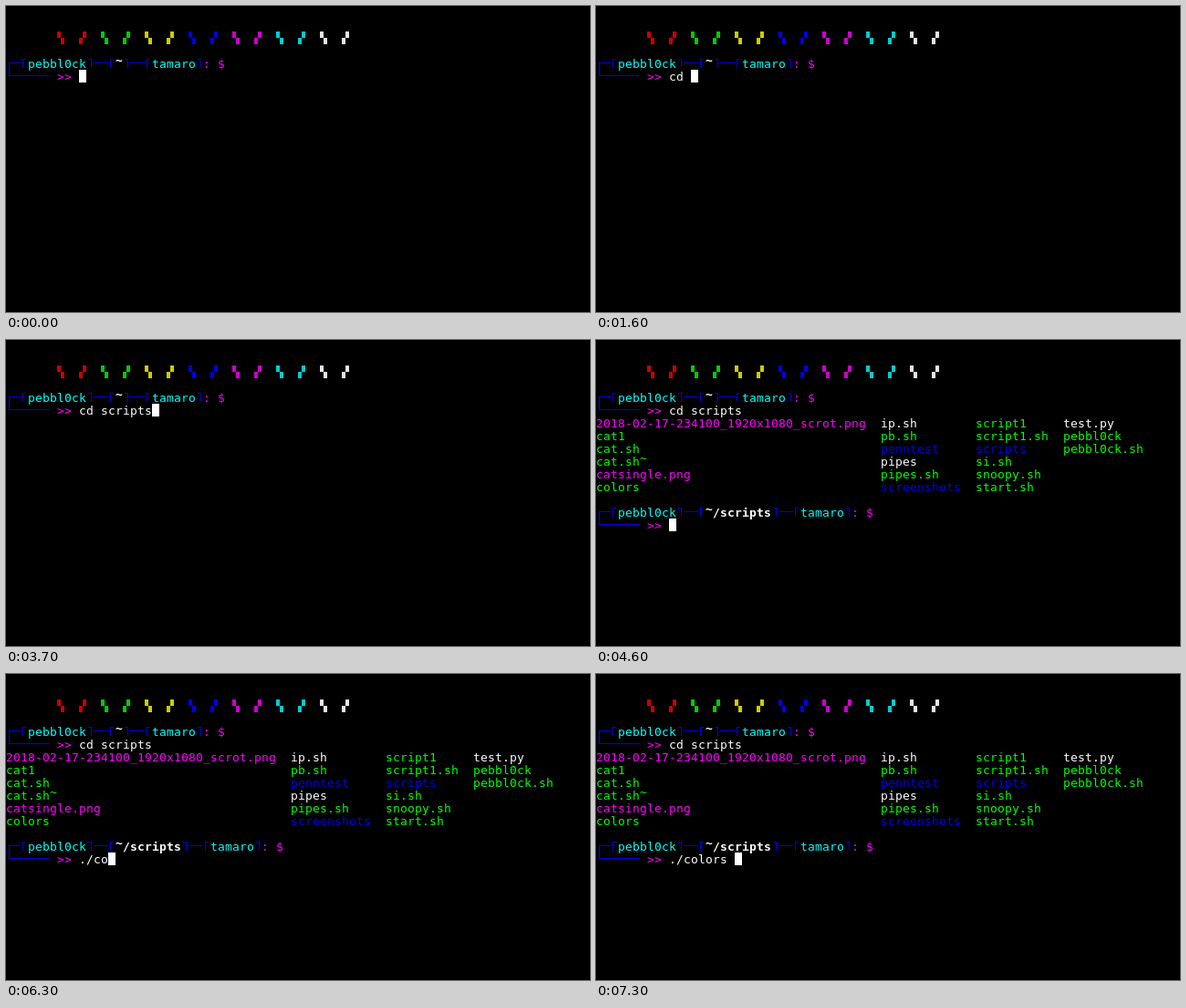
Animation, 640 px wide and 336 px high, one loop 8 s. Source, as an HTML page with a canvas:

```html
<!DOCTYPE html>
<html lang="en">
<head>
<meta charset="utf-8">
<title>Terminal session</title>
<style>
  html, body { margin: 0; width: 100%; height: 100%; overflow: hidden; background: #000; }
  canvas { display: block; }
</style>
</head>
<body>
<canvas id="screen" width="640" height="336"></canvas>
<script>
const canvas = document.getElementById('screen'), ctx = canvas.getContext('2d');
const CELL_W = 8, CELL_H = 14, BASELINE = 12, MIDDLE = 6;
const LOOP = 8000, ENTER = 4600, KEY_DELAY = 100;
const USER = 'pebbl0ck', HOST = 'tamaro';
const BLUE = '#0000ee', WHITE = '#e5e5e5';
const LIME = '#00ff00', AQUA = '#00ffff', PINK = '#ff00ff';
const BLOCKS = ['#cd0000', '#00cd00', '#cdcd00', BLUE, '#cd00cd', '#00cdcd', WHITE];

// Parts of line-drawing characters, as rectangles inside a cell
const across = (x, y, w) => [x, y, w, 1];
const down = (x, y, h) => [x, y, 1, h];
const quarter = (x, y) => [x * CELL_W / 2, y * CELL_H / 2, CELL_W / 2, CELL_H / 2];
const glyphs = {
  '─': [across(0, MIDDLE, CELL_W)],
  '┌': [across(3, MIDDLE, 5), down(3, MIDDLE, CELL_H - MIDDLE)],
  '└': [across(3, MIDDLE, 5), down(3, 0, MIDDLE)],
  '[': [across(2, 2, 4), down(2, 2, 10)],
  ']': [across(2, 2, 4), down(5, 2, 10)],
  '▚': [quarter(0, 0), quarter(1, 1)],
  '▞': [quarter(1, 0), quarter(0, 1)],
  '█': [[0, 0, CELL_W, CELL_H]]
};

// Draws text on the character grid and returns the next column
function put(col, row, text, color, weight = 400) {
  ctx.fillStyle = color;
  ctx.font = `${weight} 13px "DejaVu Sans Mono", monospace`;
  for (const ch of text) {
    const x = col++ * CELL_W, y = row * CELL_H;
    if (glyphs[ch]) {
      for (const [gx, gy, w, h] of glyphs[ch]) ctx.fillRect(x + gx, y + gy, w, h);
    } else {
      ctx.fillText(ch, x, y + BASELINE - (ch === '~' ? 4 : 0));
    }
  }
  return col;
}

function prompt(row, path, typed, active) {
  let col = put(0, row, '┌─[', BLUE);
  col = put(col, row, USER, AQUA);
  col = put(col, row, ']──[', BLUE);
  col = put(col, row, path, '#fff', 700);
  col = put(col, row, ']──[', BLUE);
  col = put(col, row, HOST, AQUA);
  col = put(col, row, ']', BLUE);
  put(col, row, ': $', PINK);
  put(0, row + 1, '└─────', BLUE);
  put(7, row + 1, '>>', PINK);
  col = put(10, row + 1, typed, '#fff');
  if (active) put(col, row + 1, '█', '#fff');
}

// A trailing * marks an executable, / a directory
const listing = [
  '2018-02-17-234100_1920x1080_scrot.png cat1* cat.sh* cat.sh~* catsingle.png colors*',
  'ip.sh pb.sh* penntest/ pipes pipes.sh* screenshots/',
  'script1* script1.sh* scripts/ si.sh* snoopy.sh* start.sh*',
  `test.py ${USER}* ${USER}.sh*`
].map(column => column.split(' '));

function fileColor(file) {
  if (file.endsWith('*')) return LIME;
  if (file.endsWith('/')) return BLUE;
  return file.endsWith('.png') ? PINK : '#fff';
}

function listFiles(row) {
  let col = 0;
  for (const files of listing) {
    const names = files.map(file => file.replace(/[*/]$/, ''));
    names.forEach((name, i) => put(col, row + i, name, fileColor(files[i])));
    col += Math.max(...names.map(name => name.length)) + 2;
  }
}

// Bursts of typing: start time and keys
const cdBursts = [[1400, 'cd '], [1800, 'sc'], [2400, 'r'], [3400, 'ip'], [3700, 't'], [3700, 's']];
const runBursts = [[5900, './'], [6200, 'co'], [6500, 'lor'], [6900, 's'], [7300, ' ']];
const typedAt = (bursts, t) => bursts.map(([start, keys]) =>
  keys.slice(0, Math.max(0, Math.floor((t - start) / KEY_DELAY) + 1))).join('');

function draw(t) {
  ctx.clearRect(0, 0, canvas.width, canvas.height);
  BLOCKS.forEach((color, i) => put(7 + i * 6, 2, '▚  ▞', color));
  prompt(4, '~', typedAt(cdBursts, t), t < ENTER);
  if (t < ENTER) return;
  listFiles(6);
  prompt(13, '~/scripts', typedAt(runBursts, t), true);
}

const start = performance.now();
function frame() {
  draw((performance.now() - start) % LOOP);
  requestAnimationFrame(frame);
}
frame();
</script>
</body>
</html>
```
